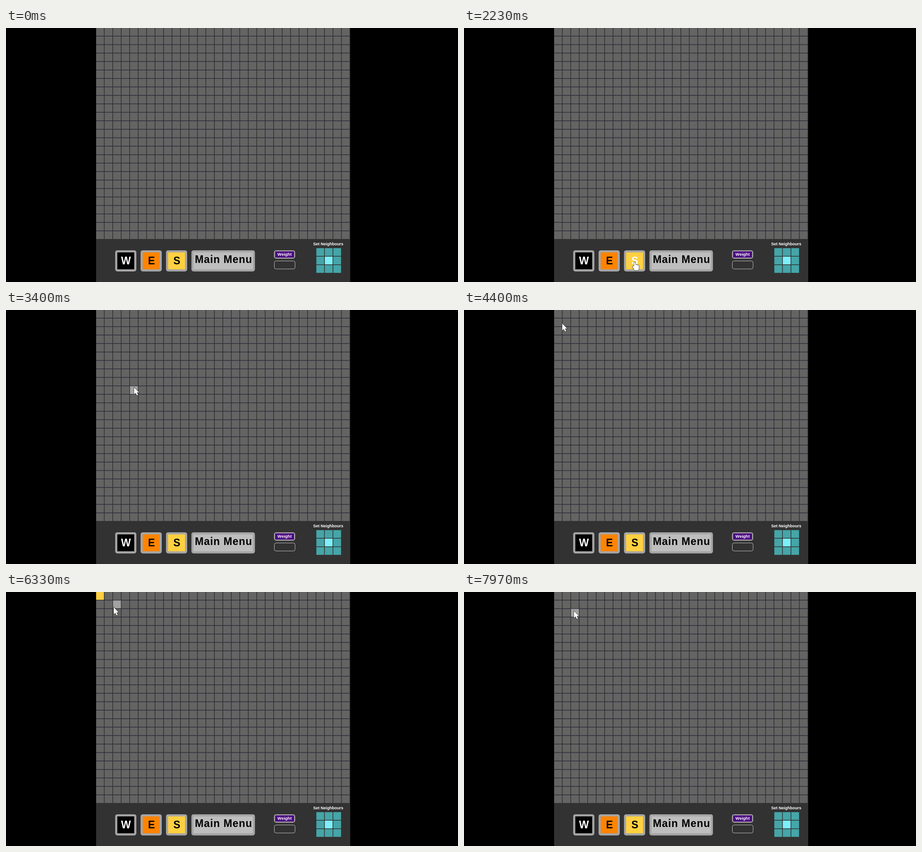
These frames come from a looping animation (998 px wide and 561 px high, 8000 ms). An HTML page with a canvas:

```html
<!DOCTYPE html>
<html lang="en">
<head>
<meta charset="utf-8">
<title>Grid editor</title>
<style>
  html, body { margin: 0; width: 100%; height: 100%; overflow: hidden; background: #000; }
  canvas { display: block; }
</style>
</head>
<body>
<canvas id="stage" width="998" height="561"></canvas>
<script>
const ctx = document.getElementById('stage').getContext('2d');
const LOOP = 8000;

// The whole layout is built on one square unit.
const UNIT = 561 / 30, GAP = 1.5, CELL = UNIT - GAP;
const COLS = 30, ROWS = 25, LEFT = 199, WIDTH = COLS * UNIT, PANEL_TOP = 466;
const colX = col => LEFT + col * UNIT;
const rowY = row => row * UNIT;

const YELLOW = '#ffd040', FRAME = '#a6a6a6';
const POINTER_SHOWN = 1720, CELL_SET = 5500, CELL_CLEARED = 7200;

const entry = { x: 712, y: 266 };
const moves = [
  { from: 1720, until: 2200, x: 377, y: 517 },
  { from: 2520, until: 3400, x: 283, y: 171 },
  { from: 3400, until: 4300, x: 217, y: 30 },
  { from: 4500, until: 5100, x: 208, y: 10 },
  { from: 5850, until: 6330, x: 238, y: 34 },
  { from: 6600, until: 6900, x: 208, y: 10 },
  { from: 7350, until: 7950, x: 243, y: 42 }
];

function pointerAt(t) {
  let { x, y } = entry;
  for (const move of moves) {
    const k = Math.min(1, Math.max(0, (t - move.from) / (move.until - move.from)));
    const eased = k * k * (3 - 2 * k);
    x += (move.x - x) * eased;
    y += (move.y - y) * eased;
  }
  return { x, y };
}

function rect(x, y, w, h, color) {
  ctx.fillStyle = color;
  ctx.fillRect(x, y, w, h);
}

function framed(x, y, w, h, border, fill) {
  ctx.beginPath();
  ctx.roundRect(x, y, w, h, 5);
  ctx.fillStyle = FRAME;
  ctx.fill();
  rect(x + border, y + border, w - 2 * border, h - 2 * border, fill);
}

function text(label, x, y, size, color, spacing = 0) {
  ctx.font = `bold ${size}px "Liberation Sans", sans-serif`;
  ctx.letterSpacing = spacing + 'px';
  ctx.fillStyle = color;
  ctx.fillText(label, x - (ctx.measureText(label).width - spacing) / 2, y);
}

const BUTTON_Y = rowY(26.25), BUTTON_H = 2.5 * UNIT;
const buttons = [
  { label: 'W', fill: '#000', ink: '#fff' },
  { label: 'E', fill: '#ff8400', ink: '#000' },
  { label: 'S', fill: YELLOW, ink: '#000' },
  { label: 'Main Menu', fill: '#bebebe', ink: '#000', wide: true }
].map((button, i) => ({ ...button, x: colX(2.25 + 3 * i), w: UNIT * (button.wide ? 7.5 : 2.5) }));

const isOver = (button, p) => p && p.x > button.x && p.x < button.x + button.w
  && p.y > BUTTON_Y && p.y < BUTTON_Y + BUTTON_H;

function drawCell(col, row, color) {
  rect(colX(col), rowY(row), CELL, CELL, color);
}

function drawGrid(t, pointer) {
  rect(LEFT, 0, WIDTH, PANEL_TOP, '#646464');
  for (let row = 1; row < ROWS; row++) rect(LEFT, rowY(row) - GAP, WIDTH, GAP, '#2d2d3c');
  for (let col = 1; col <= COLS; col++) rect(colX(col) - GAP, 0, GAP, PANEL_TOP, '#31312c');

  if (pointer) {
    const col = (pointer.x - LEFT) / UNIT, row = pointer.y / UNIT;
    const offGap = Math.max(col % 1, row % 1) < CELL / UNIT;
    if (row < ROWS && offGap) drawCell(Math.floor(col), Math.floor(row), '#a2a2a2');
  }
  if (t >= CELL_SET && t < CELL_CLEARED) drawCell(0, 0, YELLOW);
}

function drawPanel(pointer) {
  rect(LEFT, PANEL_TOP, WIDTH, 561 - PANEL_TOP, '#323232');
  for (const button of buttons) {
    const { label, x, w, fill, ink, wide } = button;
    framed(x, BUTTON_Y, w, BUTTON_H, UNIT / 4, fill);
    const color = isOver(button, pointer) ? '#fff' : ink;
    text(label, x + w / 2 + 0.5, wide ? 519.3 : 522, 23, color, wide ? 0.9 : 0);
  }

  framed(colX(21), BUTTON_Y, BUTTON_H, UNIT, 2.5, '#4b0082');
  text('Weight', colX(22.25), 503.3, 9.5, '#fff');
  ctx.beginPath();
  ctx.roundRect(colX(21) + 0.8, rowY(27.5) + 0.3, BUTTON_H - 1, UNIT - 1, 4);
  ctx.strokeStyle = '#bebebe';
  ctx.lineWidth = 1;
  ctx.stroke();

  text('Set Neighbours', colX(27.4), 479.6, 9, '#fff');
  for (let i = 0; i < 9; i++) {
    drawCell(26 + i % 3, 26 + Math.floor(i / 3), i === 4 ? '#7deffb' : '#45a5a8');
  }
}

const arrow = new Path2D('M0 0V15L3.5 12L6 17.5L8.5 16.5L6 11H10.5Z');

const hand = new Path2D();
hand.roundRect(-1.5, 0, 3, 14, 1.5);
for (let finger = 1; finger < 4; finger++) hand.roundRect(finger * 2.5 - 1.5, 5 + finger / 2, 3, 9, 1.5);
hand.roundRect(-2, 9, 11, 9, 3);
hand.roundRect(-5, 9, 5, 4, 2);

function drawPointer(pointer) {
  const shape = buttons.some(button => isOver(button, pointer)) ? hand : arrow;
  ctx.save();
  ctx.translate(pointer.x, pointer.y);
  ctx.strokeStyle = '#333';
  ctx.lineWidth = 1.4;
  ctx.stroke(shape);
  ctx.fillStyle = '#fff';
  ctx.fill(shape);
  ctx.restore();
}

function draw(now) {
  const t = now % LOOP;
  const pointer = t >= POINTER_SHOWN ? pointerAt(t) : null;
  rect(0, 0, 998, 561, '#000');
  drawGrid(t, pointer);
  drawPanel(pointer);
  if (pointer) drawPointer(pointer);
  requestAnimationFrame(draw);
}
requestAnimationFrame(draw);
</script>
</body>
</html>
```
